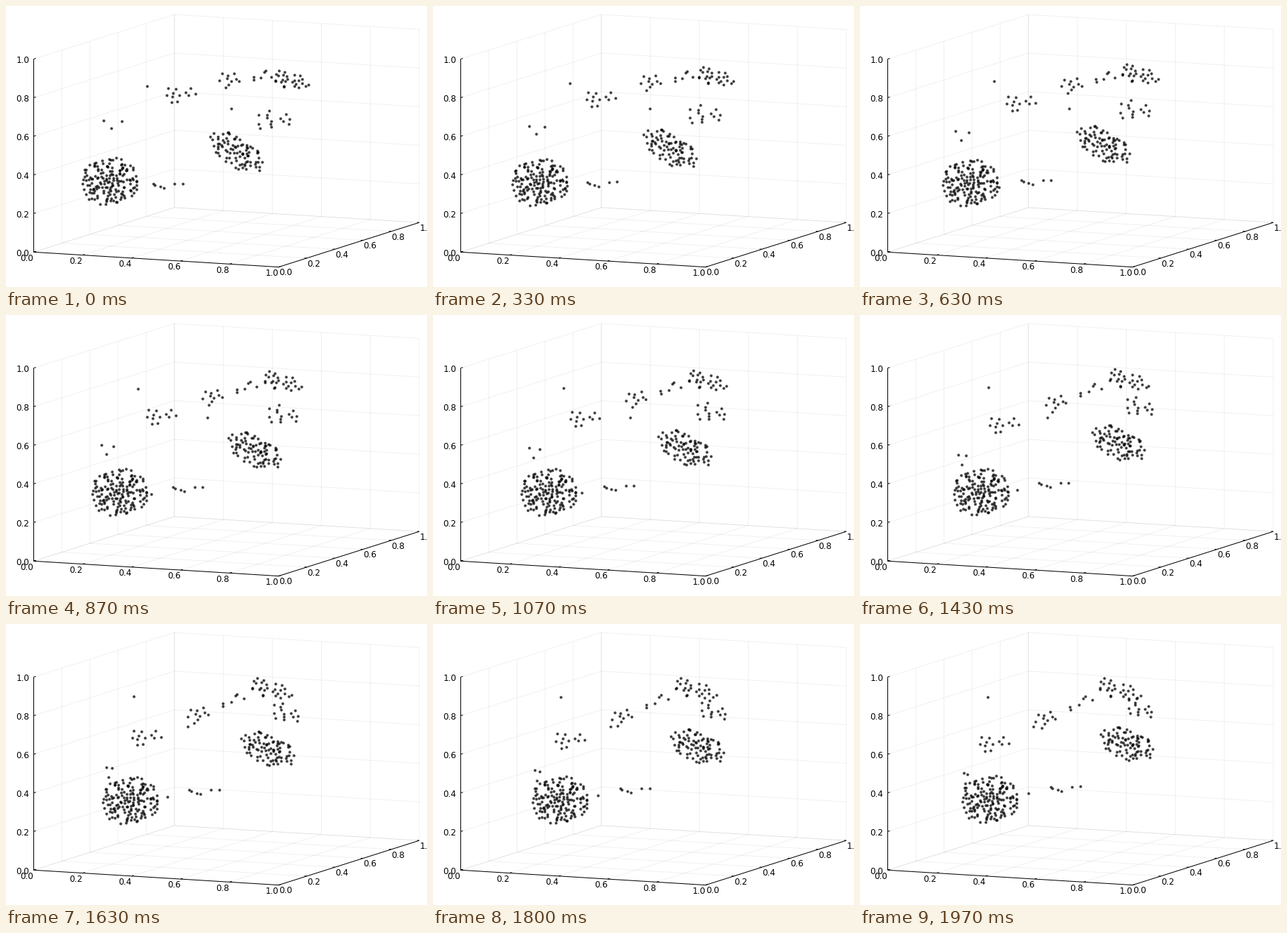
Animation, 600 px wide and 400 px high, one loop 2.01 s. Source, as a matplotlib script:

```python
import numpy as np
import matplotlib.pyplot as plt
from matplotlib.animation import FuncAnimation

W, H, DPI = 600, 400, 100
FRAMES, INTERVAL = 60, 33.5
PX = 72 / DPI
GOLDEN_ANGLE = np.pi * (3 - np.sqrt(5))

plt.rcParams["font.family"] = "DejaVu Sans"
rng = np.random.default_rng(11)

fig = plt.figure(figsize=(W / DPI, H / DPI), dpi=DPI, facecolor="white")
ax = fig.add_axes([0, 0, 1, 1])
ax.set(xlim=(0, W), ylim=(H, 0))
ax.axis("off")

# Orthographic unit cube
ORIGIN = np.array([39.5, 350.3])
BASIS = np.array([[349, 21.3], [200.5, -63.4], [0, -274.8]])
TICKS = np.linspace(0, 1, 6)


def project(*p):
    return ORIGIN + np.array(p) @ BASIS


def line(*corners, alpha=1.0):
    pts = np.array([project(*c) for c in corners])
    ax.plot(pts[:, 0], pts[:, 1], color="black", lw=PX, alpha=alpha,
            solid_capstyle="butt", zorder=1)


def label(corner, dx, dy, t, ha="center"):
    x, y = project(*corner)
    ax.text(x + dx, y + dy, f"{t:.1f}", size=12 * PX, ha=ha,
            va="center_baseline")


def draw_box():
    for t in TICKS:
        # Grid lines fold from one face of the box onto the next
        line((t, 0, 0), (t, 1, 0), (t, 1, 1), alpha=0.06)
        line((1, t, 0), (0, t, 0), (0, t, 1), alpha=0.06)
        line((0, 0, t), (0, 1, t), (1, 1, t), alpha=0.06)

        line((t, 0, 0), (t, 0.015, 0))
        line((1, t, 0), (0.991, t, 0))
        line((0, 0, t), (0, 0.015, t))

        label((t, 0, 0), -9.5, 7.4, t)
        label((1, t, 0), 9.8, 6.8, t)
        label((0, 0, t), -6.2, 0.5, t, ha="right")
    line((0, 0, 1), (0, 0, 0), (1, 0, 0), (1, 1, 0))


def ellipse(unit, center, shape):
    """Place unit-disc points in an ellipse of half width, half height, tilt."""
    width, height, tilt = shape
    u, v = unit.T
    return np.column_stack([center[0] + width * u,
                            center[1] + height * v + tilt * u])


def swarm(n, start, end, bend=(0, 0), shape=(0, 0, 0), end_shape=None):
    """Loose sunflower of n points that drifts along a bowed path."""
    k = np.arange(n) + 0.5
    r = (k / n) ** 0.58 + rng.normal(0, 0.03, n)
    a = k * GOLDEN_ANGLE + rng.normal(0, 0.3, n)
    unit = np.column_stack([r * np.cos(a), r * np.sin(a)])
    return (ellipse(unit, start, shape),
            ellipse(unit, end, end_shape or shape),
            np.tile(bend, (n, 1)))


swarms = [
    # big swarm, its trail and the strays above it
    swarm(158, (147, 248.5), (185, 248.5), (-11, 11), (43, 33, 0)),
    swarm(7, (217, 256), (280, 234), (4, 8), (42, 6, -7)),
    swarm(3, (149, 168), (150, 220), (-28, 1), (17, 15, 0), (3, 22, 0)),
    # middle swarm and the climbers above it
    swarm(86, (328, 206.5), (380.5, 169), (11, 8), (39, 24, 17), (39, 23, 9)),
    swarm(14, (378, 161), (396, 118), (22, -5), (32, 15, -4), (23, 14, 5)),
    # upper band, left to right
    swarm(1, (200, 113), (181, 104), (-18, -18)),
    swarm(12, (246, 124), (187, 169), (-8, -8), (26, 13, -2)),
    swarm(10, (319, 105), (264, 136), (0, -9), (20, 12, -2), (20, 12, -6)),
    swarm(1, (320, 145), (245, 145)),
    swarm(6, (361, 99), (309, 113), (0, -9), (20, 9, -2), (26, 8, -10)),
    swarm(26, (405, 106), (367, 94), (17, -22), (26, 14, 6), (32, 15, 9)),
]
start, end, bow = (np.vstack(part) for part in zip(*swarms))

draw_box()
dots = ax.scatter(*start.T, s=(4 * PX) ** 2, color="black", alpha=0.75,
                  linewidths=0, zorder=3)


def draw(i):
    u = i / (FRAMES - 1)
    dots.set_offsets(start + (end - start) * u + bow * u * (1 - u) + 0.5)
    return dots,


anim = FuncAnimation(fig, draw, frames=FRAMES, interval=INTERVAL,
                     repeat=True, repeat_delay=0)
plt.show()
```
